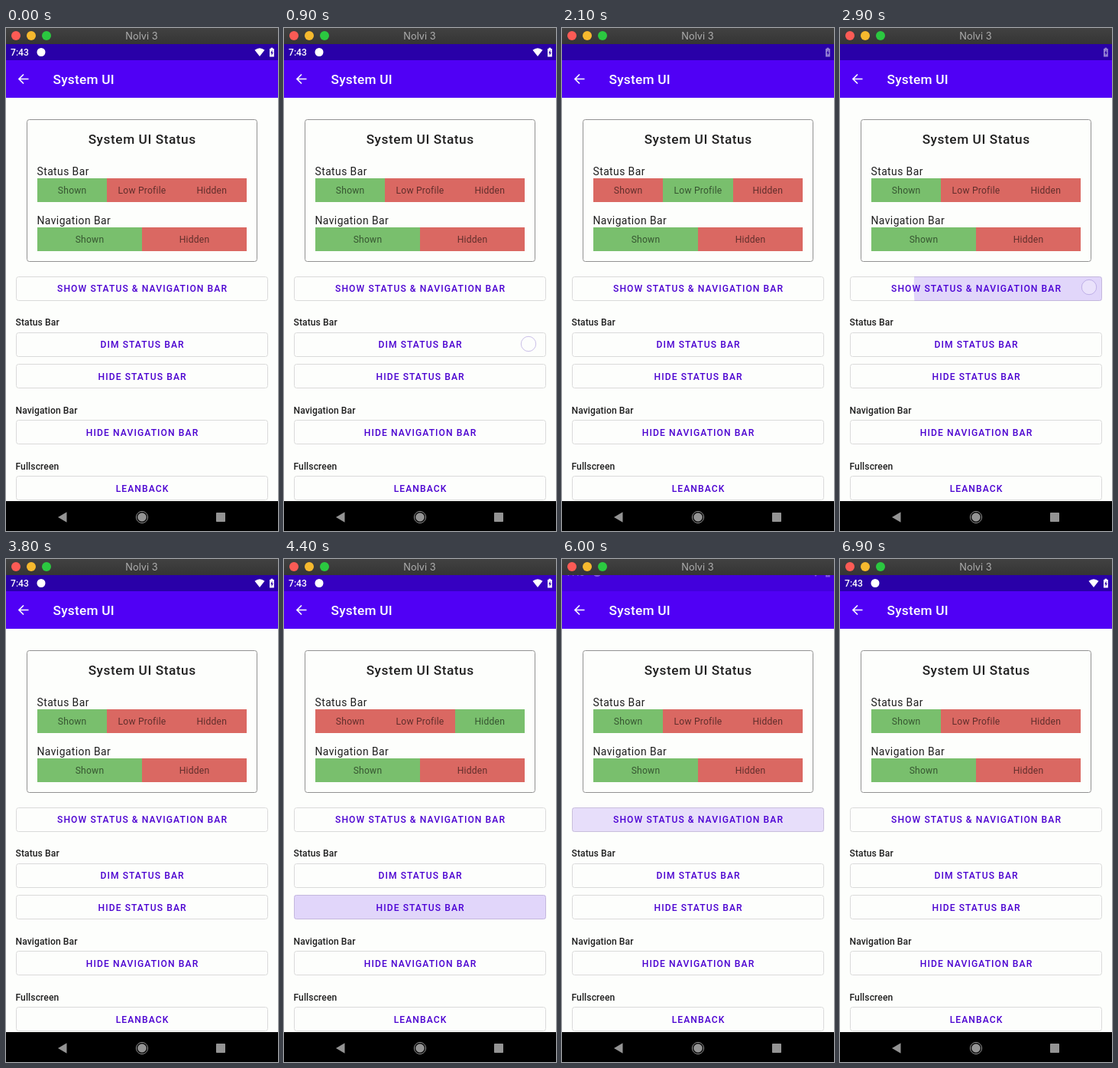
Write an HTML page that moves like this. It is 356x656 px and loops after 7800 ms.

```html
<!DOCTYPE html>
<html lang="en">
<head>
<meta charset="utf-8">
<title>System UI</title>
<style>
  html, body { margin: 0; width: 100%; height: 100%; overflow: hidden; background: #fdfefc; }
  svg { display: block; width: 356px; height: 656px; font-family: Roboto, sans-serif; }
  .head { font-size: 17.3px; font-weight: 500; letter-spacing: .0125em; }
  .card { letter-spacing: .03125em; fill: #1f1f1f; }
  .label { font-size: 13.86px; letter-spacing: .03125em; fill: #1f1f1f; }
  .cell { font-size: 12.12px; letter-spacing: .0179em; fill: #000; fill-opacity: .56; }
  .section { font-size: 12.12px; font-weight: 500; letter-spacing: .00714em; fill: #1f1f1f; }
  .button { font-size: 12.12px; font-weight: 500; letter-spacing: .0893em; fill: #4b00d1; }
  .mid { text-anchor: middle; }
</style>
</head>
<body>
<svg id="stage" viewBox="0 0 356 656">
  <defs>
    <linearGradient id="chrome" x2="0" y2="1">
      <stop stop-color="#414141"/><stop offset="1" stop-color="#353535"/>
    </linearGradient>
    <clipPath id="barClip"><rect y="21" width="356" height="21"/></clipPath>
  </defs>
  <rect width="356" height="656" fill="#fdfefc"/>

  <!-- app bar and system status bar -->
  <rect y="21" width="356" height="70" fill="#5000f5"/>
  <rect id="barShade" y="21" width="356" height="21" fill="#2900a8"/>
  <g clip-path="url(#barClip)">
    <g id="bar" fill="#fff">
      <g id="icons">
        <text x="6" y="36" font-size="12.12" font-weight="500">7:43</text>
        <circle cx="46" cy="31.5" r="5.5"/>
        <path d="M325.5 28.8Q332 23.6 338.5 28.8L332 37Z"/>
      </g>
      <g id="battery">
        <path d="M345 27h1.5v-1.2h2.8V27h1.5v10.5h-5.8z"/>
        <path d="M348.5 28.5l-2.2 4.2h1.3v3.3l2.2-4.3h-1.3z" fill="#2900a8"/>
      </g>
    </g>
  </g>
  <path d="M29.5 66.5H17.5M23 60.5L17 66.5L23 72.5" fill="none" stroke="#fff" stroke-width="1.7"/>
  <text class="head" x="61.5" y="73" fill="#fff">System UI</text>

  <!-- status card -->
  <rect x="27.5" y="119.5" width="301" height="185" rx="3" fill="none" stroke="#929292"/>
  <text class="head card mid" x="178.2" y="151">System UI Status</text>
  <text class="label" x="40.5" y="192">Status Bar</text>
  <text class="label" x="40.5" y="256">Navigation Bar</text>
  <g id="cells"></g>

  <text class="section" x="12.5" y="388">Status Bar</text>
  <text class="section" x="12.5" y="502.5">Navigation Bar</text>
  <text class="section" x="12.5" y="575.5">Fullscreen</text>
  <g id="buttons"></g>
  <g id="taps"></g>

  <!-- navigation bar -->
  <rect y="617" width="356" height="39"/>
  <g fill="#949494">
    <path d="M68 638L79.5 631.3V644.7Z"/>
    <circle cx="178" cy="638" r="5.8"/>
    <circle cx="178" cy="638" r="7.6" fill="none" stroke="#949494"/>
    <rect x="275" y="632" width="12" height="12" rx=".8"/>
  </g>

  <!-- window title -->
  <rect width="356" height="21" fill="url(#chrome)"/>
  <circle cx="13" cy="10" r="6" fill="#fc5b55"/>
  <circle cx="33" cy="10" r="6" fill="#f6b92e"/>
  <circle cx="53" cy="10" r="6" fill="#2bc840"/>
  <text class="mid" x="177.5" y="14.8" font-size="12.8" style="font-family:Inter,sans-serif" fill="#aeaeae">Nolvi 3</text>
</svg>
<script>
const LOOP = 7800, STEP = 100;
const GREEN = '#79bf6d', RED = '#da6862';
const $ = id => document.getElementById(id);

function add(parent, tag, attrs, text = '') {
  const el = document.createElementNS('http://www.w3.org/2000/svg', tag);
  for (const k in attrs) el.setAttribute(k, attrs[k]);
  el.textContent = text;
  return parent.appendChild(el);
}
const set = (el, attrs) => { for (const k in attrs) el.setAttribute(k, attrs[k]); };
const ramp = (t, from, to) => Math.min(1, Math.max(0, (t - from) / (to - from)));

// segmented row of cells; returns the cell backgrounds
function row(y, names) {
  const w = 274 / names.length;
  const edge = i => Math.round(41 + i * w);
  return names.map((name, i) => {
    const rect = add($('cells'), 'rect', { x: edge(i), y, width: edge(i + 1) - edge(i), height: 31 });
    add($('cells'), 'text', { class: 'cell mid', x: 41 + (i + .5) * w, y: y + 20.3 }, name);
    return rect;
  });
}
const status = row(196, ['Shown', 'Low Profile', 'Hidden']);
row(260, ['Shown', 'Hidden']).forEach((r, i) => set(r, { fill: i ? RED : GREEN }));

const box = y => ({ x: 13, y, width: 330, height: 32, rx: 3 });
const buttons = [
  [324, 'SHOW STATUS & NAVIGATION BAR'], [397, 'DIM STATUS BAR'], [438.5, 'HIDE STATUS BAR'],
  [511.5, 'HIDE NAVIGATION BAR'], [584.5, 'LEANBACK']
];
for (const [y, name] of buttons) {
  add($('buttons'), 'rect', { x: 13.5, y: Math.floor(y) + .5, width: 329, height: 31, rx: 3, fill: 'none', stroke: '#dadada' });
  add($('buttons'), 'text', { class: 'button mid', x: 178.6, y: y + 20.3 }, name);
}

// press time, touch point, button top, resulting status cell
const taps = [
  { at: 860, x: 320, y: 412, top: 397, cell: 1 },
  { at: 2700, x: 326, y: 338, top: 324, cell: 0 },
  { at: 4080, x: 320, y: 454, top: 438, cell: 2 },
  { at: 5620, x: 320, y: 339, top: 324, cell: 0 }
];
taps.forEach((tap, i) => {
  const clip = add($('taps'), 'clipPath', { id: 'clip' + i });
  add(clip, 'rect', box(tap.top));
  const g = add($('taps'), 'g', { 'clip-path': `url(#clip${i})` });
  tap.ripple = add(g, 'circle', { cx: tap.x, cy: tap.y, fill: '#5000e8' });
  tap.touch = add($('taps'), 'circle', {
    cx: tap.x, cy: tap.y, r: 9.7, fill: '#fff', 'fill-opacity': .3, stroke: '#a08cd8', 'stroke-opacity': .55
  });
});

function draw(t) {
  let cell = 0;
  for (const tap of taps) {
    const d = t - tap.at;
    if (d >= 200) cell = tap.cell;
    set(tap.touch, { opacity: d >= 0 && d < 250 ? 1 : 0 });
    set(tap.ripple, {
      r: 318 * (1 - (1 - ramp(d, 100, 350)) ** 2.5),
      opacity: d > 100 ? .155 * (1 - ramp(d, 350, 500)) : 0
    });
  }
  status.forEach((r, i) => set(r, { fill: i === cell ? GREEN : RED }));

  const dim = ramp(t, 1300, 2050) - ramp(t, 2900, 3150);
  const back = ramp(t, 5900, 6200);
  const away = ramp(t, 4400, 4700) - back;
  set($('icons'), { opacity: 1 - dim });
  set($('battery'), { opacity: 1 - dim / 2 });
  set($('bar'), { transform: `translate(0 ${-21 * away})`, opacity: 1 - away });
  set($('barShade'), { opacity: 1 - ramp(t, 4300, 4600) + back });
}

const start = performance.now();
function tick() {
  const t = (performance.now() - start) % LOOP;
  draw(Math.floor(t / STEP) * STEP);
  requestAnimationFrame(tick);
}
tick();
</script>
</body>
</html>
```
